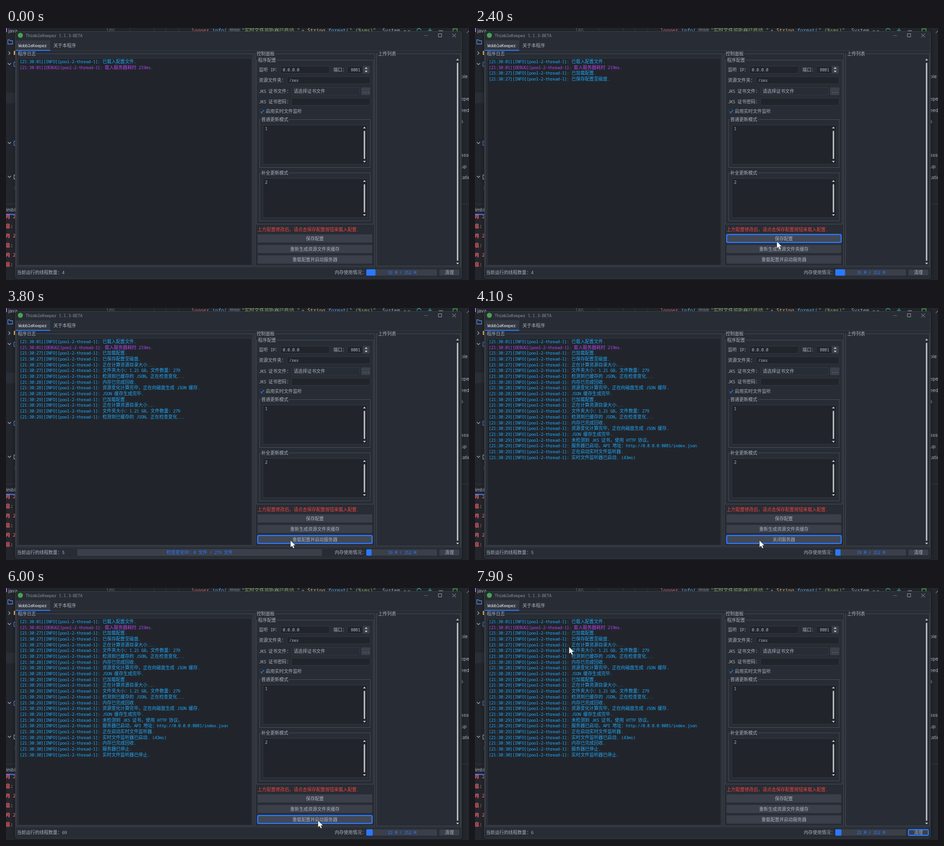
These frames come from a looping animation (1014x552 px, 8 s). An HTML page:

```html
<!DOCTYPE html>
<html lang="zh-CN">
<head>
<meta charset="utf-8">
<title>ThimbleKeeper</title>
<style>
html, body { margin: 0; width: 100%; height: 100%; overflow: hidden; background: #23262c; }
svg { display: block; }
text { font: 500 9.6px 'Noto Sans Mono', 'DejaVu Sans Mono', monospace; letter-spacing: -.58px; white-space: pre; }
.c { font: 9.87px 'Noto Sans CJK SC', 'Noto Sans CJK JP', 'Noto Sans CJK', sans-serif; letter-spacing: 0; }
.ide text { font: 10.5px Inter, sans-serif; letter-spacing: 0; }
.code text { font: 10.8px 'Noto Sans Mono', monospace; letter-spacing: 0; }
.code .c { font-size: 10.8px; }
.console text, .console .c { font-size: 10.5px; font-weight: 600; }
.mid text { text-anchor: middle; }
</style>
</head>
<body>
<svg id="stage" width="1014" height="552" viewBox="0 0 1014 552"></svg>
<script>
const LOOP = 8000, STEP = 100;
const BG = '#282c34', DARK = '#21252b', LINE = '#4a4f58', EDGE = '#343943',
  BTN = '#3a3f4a', HOVER = '#424854', BLUE = '#2979ff', GREY = '#abb2bf', BAR = '#c5c8cd', RED = '#f0606a';

// Markup helpers; y of a text is the middle of its line.
const runs = s => String(s).replace(/[\u3000-\uffef]+/g, m => `<tspan class="c">${m}</tspan>`);
const text = (x, y, s, fill = GREY, extra = '') =>
  `<text x="${x}" y="${y + 3.5}" fill="${fill}" ${extra}>${runs(s)}</text>`;
const rect = (x, y, x2, y2, fill, stroke = 'none', r = 0, extra = '') =>
  `<rect x="${x}" y="${y}" width="${x2 - x}" height="${y2 - y}" rx="${r}" fill="${fill}" stroke="${stroke}" ${extra}/>`;
const path = (d, stroke, w = 1, fill = 'none') =>
  `<path d="${d}" fill="${fill}" stroke="${stroke}" stroke-width="${w}"/>`;
const group = (x, y, x2, y2, title, chars) =>
  rect(x + .5, y + .5, x2 + .5, y2 + .5, 'none', LINE) +
  rect(x + 3, y - 1, x + 5 + chars * 9.87, y + 2, BG) + text(x + 4, y, title);
const field = (x, y, x2, y2, s = '', fill = DARK) =>
  rect(x + .5, y + .5, x2 + .5, y2 + .5, fill, EDGE, 2) + text(x + 5, (y + y2) / 2, s);
const scroll = (x, y, y2) =>
  path(`M${x - 3} ${y + 2}h6l-3-4zM${x - 3} ${y2 - 2}h6l-3 4z`, 'none', 0, BAR) +
  rect(x - 1.5, y + 7, x + 1.5, y2 - 6, BAR, 'none', 1.5);
const area = (y, s) =>
  rect(562.5, y + .5, 791.5, y + 86.5, DARK, EDGE) + text(567, y + 8, s) + scroll(785, y + 6, y + 81);

const LOG = [
  [0, '01', '已载入配置文件.'],
  [0, '01', '载入服务器耗时 219ms.', 'DEBUG'],
  [2100, '27', '已加载配置.'],
  [2100, '27', '已保存配置至磁盘.'],
  [2900, '27', '正在计算资源目录大小...'],
  [3000, '27', '文件夹大小：1.21 GB，文件数量：279'],
  [3000, '27', '检测到已缓存的 JSON，正在检查变化...'],
  [3100, '28', '内存已完成回收.'],
  [3100, '28', '资源变化计算完毕，正在向磁盘生成 JSON 缓存.'],
  [3100, '28', 'JSON 缓存生成完毕.'],
  [3700, '29', '已加载配置.'],
  [3700, '29', '正在计算资源目录大小...'],
  [3800, '29', '文件夹大小：1.21 GB，文件数量：279'],
  [3800, '29', '检测到已缓存的 JSON，正在检查变化...'],
  [4000, '29', '内存已完成回收.'],
  [4000, '29', '资源变化计算完毕，正在向磁盘生成 JSON 缓存.'],
  [4000, '29', 'JSON 缓存生成完毕.'],
  [4100, '29', '未检测到 JKS 证书，使用 HTTP 协议。'],
  [4100, '29', '服务器已启动，API 地址：http://0.0.0.0:8081/index.json'],
  [4100, '29', '正在启动实时文件监听器.'],
  [4100, '29', '实时文件监听器已启动. (43ms)'],
  [5200, '30', '内存已完成回收.'],
  [5200, '30', '服务器已停止.'],
  [5200, '30', '实时文件监听器已停止.']
];
const BUTTONS = [
  [551, 452, 802, 470, '保存配置'],
  [551, 475, 802, 493, '重新生成资源文件夹缓存'],
  [551, 498, 802, 516, '重载配置并启动服务器'],
  [949, 529, 993, 542, '清理']
];

// Step tables: [time, value]
const MEMORY = [[0, 33], [2200, 35], [3100, 19], [4200, 30], [4600, 31], [5500, 23], [6600, 22]];
const THREADS = [[0, 4], [3000, 5], [4200, 6], [4600, 7], [5400, 69], [7500, 6]];
const FOCUS = [[0, -1], [2000, 0], [2900, 1], [3700, 2], [6600, 3]];
const BUSY = [[0, 0], [3000, 1], [3100, 0], [3800, 1], [4000, 0]];
const RUNNING = [[0, 0], [4100, 1], [5200, 0]];
const CONSOLE = [[0, 0], [2900, 21], [3000, 0], [4200, 21], [4300, 0], [5400, 21], [5500, 0]];
const POINTER = [
  [200, 1030, 27], [900, 584, 271], [1200, 584, 271], [1700, 661, 465], [2300, 661, 465],
  [2700, 661, 481], [3300, 661, 481], [3600, 623, 509], [4400, 623, 509], [5000, 649, 506],
  [5900, 649, 506], [6400, 979, 537], [7200, 979, 537], [7900, 206, 129]
];

function backdrop() {
  const chevron = y => path(`M4 ${y - 2}l3.5 3.5 3.5-3.5`, GREY, 1.2);
  const folder = (y, c) => path(`M21 ${y - 4}h-3.5v9h4`, c, 1.3);
  const side = [[106, 'ble'], [155, 'epe'], [180, 'eed'], [204, 's'], [278, 'asse'], [303, 'up'], [327, 'tation']];
  const code = [
    [406, 'logger', '#e06c75', 1], [445, '.info(', '#61afef', 1], [516, '"实时文件监听器已启动 "', '#98c379'],
    [647, '+', GREY], [660, 'String', '#e5c07b'], [699, '.format(', '#61afef', 1],
    [752, '" (%sms)"', '#98c379'], [811, ',', GREY], [824, 'System', GREY]
  ];
  let consoleLines = '';
  for (let i = -1; i < 6; i++) consoleLines += text(-1, 413 + i * 21, i % 2 ? '息:' : '月 2', RED);
  return rect(0, 0, 1014, 552, '#23262c') +
    rect(0, 141, 22, 165, '#2a2e36') +
    path('M271.5 0v7M324.5 0v7M350.5 0v7M378.5 0v7', '#383d46') +
    `<g class="code">${text(219, 5, '106', '#626872')}` +
    rect(487, 0, 513, 8, '#30343c', 'none', 2) +
    code.map(([x, s, c, it]) => text(x, 5, s, c, it ? 'font-style="italic"' : '')).join('') + '</g>' +
    `<g class="ide">${text(490, 4, 'msg:', '#858b96')}` +
    text(5, 6, 'java') + text(0, 398, 'imble') +
    side.map(([y, s]) => text(996, y, s)).join('') + '</g>' +
    path('M1 0v9', '#b06be0', 2) +
    path('M4 26h4l1.5 2h5v7h-10.5z', '#5b8def', 1.3) +
    path('M5.5 51.5l3.5 3.5-3.5 3.5', GREY, 1.2) + rect(17, 50, 21, 59, '#e5b95c') +
    chevron(79) + chevron(252) + chevron(326) +
    folder(79, '#5b8def') + folder(252, '#5b8def') + folder(326, GREY) +
    path('M18 347l3 3-3 3', '#777d87') +
    path('M0 385.5h20M998 385.5h16', '#373b43') + rect(0, 407, 20, 409.5, BLUE) +
    `<clipPath id="cut"><path d="M0 407.5h22V552H0z"/></clipPath>
     <g class="console" clip-path="url(#cut)"><g id="console">${consoleLines}</g></g>` +
    path('M871 6h5M880 6h5', GREY) + path('M900 6a4.5 4.5 0 0 1 9-1M924 5h9M928.5 0v9', '#35a99b', 1.4) +
    path('M948 6h9', GREY, 1.3) + path('M979 7v-5h9v5', '#4caf50', 1.6) + path('M1009 11l5-5', GREY);
}

function windowFrame() {
  return `<filter id="soft" x="-5%" y="-5%" width="110%" height="110%"><feGaussianBlur stdDeviation="4"/></filter>` +
    rect(20, 9, 998, 548, '#000', 'none', 6, 'id="shadow" filter="url(#soft)"') +
    rect(20.5, 7.5, 997.5, 548.5, BG, '#3d4149', 5) +
    '<circle cx="31.5" cy="16" r="5.5" fill="#45a350"/>' +
    text(43, 16, 'ThimbleKeeper 1.1.3-BETA', '#858b96') +
    path('M916 16.5h8', '#666c76') + path('M947 12.5h7v7h-7zM977.5 12.5l8 8M985.5 12.5l-8 8', '#a3a9b4') +
    rect(21, 27, 97, 50, '#333842') + path('M21 49.5h976', '#363b44') + rect(21, 48, 97, 50, BLUE) +
    text(27, 38, 'WobbleKeeper', '#e4e7ec') + text(104, 38, '关于本程序') +
    group(22, 56, 541, 521, '程序日志', 4) + rect(26.5, 66.5, 538.5, 519.5, DARK, EDGE) +
    group(545, 56, 807, 521, '控制面板', 4) +
    group(811, 56, 995, 521, '上传列表', 4) + scroll(989, 69, 516) +
    path('M21 524.5h976', '#363b44');
}

function settings() {
  return group(548, 70, 804, 429, '程序配置', 4) +
    text(554, 91, '监听 IP：') + field(601, 83, 708, 99, '0.0.0.0') +
    text(717, 91, '端口：') + field(747, 83, 796, 99) + text(755, 91, '8081') +
    rect(781, 83.5, 796.5, 99.5, BTN, 'none', 2) +
    path('M785.5 89.5h6.5l-3.25-3.8zM785.5 93.5h6.5l-3.25 3.8z', 'none', 0, BAR) +
    text(554, 114, '资源文件夹：') + field(615, 106, 797, 122, '/res') +
    text(554, 138, 'JKS 证书文件：') + field(625, 130, 774, 146, '请选择证书文件', BG) +
    rect(778, 130, 798, 147, BTN, 'none', 2) + text(780.5, 138, '...') +
    text(554, 161, 'JKS 证书密码：') + field(625, 153, 797, 169) +
    rect(556.5, 178.5, 565.5, 187.5, DARK, '#3f4550', 2) + path('M558 183l2.2 2.5 4.3-5.5', BLUE, 1.8) +
    text(569, 182, '启用实时文件监听') +
    group(555, 200, 797, 305, '普通更新模式', 6) + area(212, 1) +
    group(555, 317, 797, 422, '补全更新模式', 6) + area(329, 2) +
    text(551, 441, '上方配置修改后，请点击保存配置按钮来载入配置.', '#f5443f');
}

const logLines = LOG.map(([, sec, msg, level = 'INFO'], i) =>
  `<g class="log">${text(30, 73.5 + i * 12.68, `[21:30:${sec}][${level}][pool-2-thread-1]: ${msg}`,
    level === 'INFO' ? '#20a8fa' : '#b044ec')}</g>`).join('');

const buttons = BUTTONS.map(([x, y, x2, y2, s]) =>
  `<g class="btn">${rect(x, y, x2, y2, BTN, 'none', 2)}${text((x + x2) / 2, (y + y2) / 2, s)}` +
  rect(x + .2, y + .2, x2 - .2, y2 - .2, 'none', BLUE, 2.5, 'stroke-width="2.5"') + '</g>').join('');

const status = text(24, 535, '当前运行的线程数量：') + `<g id="threads">${text(122.7, 535, '')}</g>` +
  text(720, 535, '内存使用情况：') + rect(789, 528.5, 944, 542.5, BTN, 'none', 2) +
  rect(789, 528.5, 809, 542.5, BLUE, 'none', 2, 'id="used"') +
  `<g class="mid"><g id="memory">${text(867, 535, '', BLUE)}</g>` +
  `<g id="busy">${rect(156, 528, 692, 543, BTN, 'none', 2)}` +
  text(424, 535, '检查变化中：0 文件 / 279 文件', BLUE) + `</g>${buttons}</g>`;

const stage = document.getElementById('stage');
stage.innerHTML = backdrop() + windowFrame() + settings() + logLines + status +
  '<path id="pointer" d="M0 0V15.3L3.5 12.2 6 17.4 8.7 16.2 6.3 11.1H11Z" fill="#fff" stroke="#222" stroke-width=".6"/>';

const $ = id => document.getElementById(id);
const logEls = [...document.querySelectorAll('.log')];
const btnEls = [...document.querySelectorAll('.btn')];
const show = (el, on) => el.style.visibility = on ? 'visible' : 'hidden';
const at = (table, t) => table.filter(row => row[0] <= t).pop()[1];

function setText(el, s) {
  const html = runs(s);
  if (el.innerHTML !== html) el.innerHTML = html;
}

function pointerAt(t) {
  const i = POINTER.findIndex(p => p[0] >= t);
  if (i < 1) return [POINTER[0][1], POINTER[0][2]];
  const [t0, x0, y0] = POINTER[i - 1], [t1, x1, y1] = POINTER[i];
  const u = (t - t0) / (t1 - t0), e = u * u * (3 - 2 * u);
  return [x0 + (x1 - x0) * e, y0 + (y1 - y0) * e];
}

function draw(time) {
  const t = Math.floor(time / STEP) * STEP;
  const [px, py] = pointerAt(t), focus = at(FOCUS, t), mem = at(MEMORY, t);
  $('pointer').setAttribute('transform', `translate(${px} ${py})`);
  show($('pointer'), t >= 300);
  logEls.forEach((el, i) => show(el, LOG[i][0] <= t));
  btnEls.forEach((el, i) => {
    const [x, y, x2, y2] = BUTTONS[i];
    const over = px >= x && px <= x2 && py >= y && py <= y2;
    el.children[0].setAttribute('fill', over ? HOVER : BTN);
    show(el.children[2], i === focus);
  });
  setText(btnEls[2].children[1], at(RUNNING, t) ? '关闭服务器' : BUTTONS[2][4]);
  setText($('threads').firstChild, at(THREADS, t));
  setText($('memory').firstChild, `${mem} M / 252 M`);
  $('used').setAttribute('width', 155 * mem / 252);
  show($('busy'), at(BUSY, t));
  $('console').setAttribute('transform', `translate(0 ${at(CONSOLE, t)})`);
  $('shadow').setAttribute('opacity', t < 2000 ? .35 : .5);
}

const start = performance.now();
function tick() {
  draw((performance.now() - start) % LOOP);
  requestAnimationFrame(tick);
}
tick();
</script>
</body>
</html>
```
